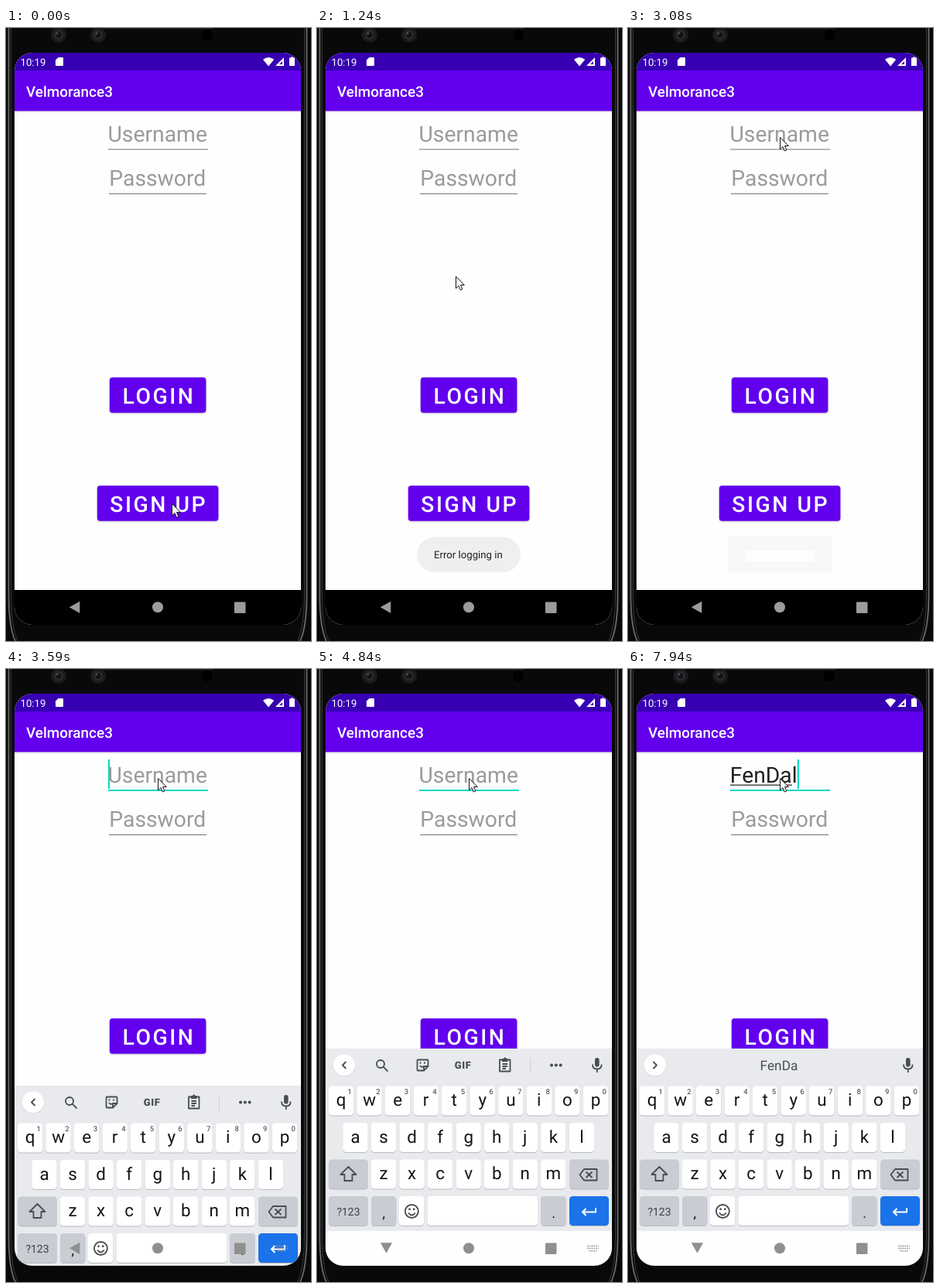
Write an HTML page that moves like this. It is 394 px wide and 793 px high and loops after 8 s.

```html
<!DOCTYPE html>
<html lang="en">
<head>
<meta charset="utf-8">
<title>Login screen</title>
<style>
html, body { margin: 0; width: 100%; height: 100%; overflow: hidden; background: #090909; }
svg { display: block; font-family: Roboto, sans-serif; }
text { white-space: pre; text-rendering: geometricPrecision; }
.hint { font-size: 28.3px; fill: #9b9b9b; }
.typed { font-size: 28.3px; fill: #202020; }
.label { font-size: 28.3px; font-weight: 500; letter-spacing: 2.53px; fill: #fff; }
.key { font-size: 22.4px; fill: #141416; text-anchor: middle; }
.digit { font-size: 9.5px; fill: #5a5e63; text-anchor: middle; font-weight: 500; }
.word { font-size: 17.3px; fill: #4a4d51; text-anchor: middle; }
.line { fill: none; stroke: #494c50; stroke-width: 1.8; stroke-linejoin: round; }
.solid { fill: #494c50; }
</style>
</head>
<body>
<svg id="stage" width="394" height="793" viewBox="0 0 394 793">
  <defs>
    <clipPath id="screen"><rect x="11" y="32" width="370" height="740" rx="23"/></clipPath>
    <clipPath id="signUpShape"><rect x="117.8" y="592" width="156.6" height="45.7" rx="3.8"/></clipPath>
    <linearGradient id="barShadow" x2="0" y2="1">
      <stop stop-color="#d8d8d8"/><stop offset="1" stop-color="#fefefe"/>
    </linearGradient>
    <filter id="raise" x="-10%" y="-20%" width="120%" height="150%">
      <feDropShadow dx="0" dy="1" stdDeviation="1" flood-opacity=".22"/>
    </filter>
    <filter id="press" x="-10%" y="-20%" width="120%" height="160%">
      <feDropShadow dx="0" dy="2" stdDeviation="2" flood-opacity=".35"/>
    </filter>
  </defs>

  <!-- phone body -->
  <rect width="394" height="793" fill="#090909"/>
  <g id="edge" fill="none">
    <path d="M3.5 0V738Q4 776 12 793" stroke="#6a6a6a" stroke-width="1.8"/>
    <path d="M6.5 0V738Q7 774 15 793" stroke="#3a3a3a"/>
  </g>
  <use href="#edge" transform="translate(392) scale(-1 1)"/>
  <rect x="122" y="-2" width="146" height="3" rx="1" fill="#2c2c2c"/>
  <g id="lens">
    <circle cx="68" cy="9" r="10" fill="#1b1b1d"/>
    <circle cx="68" cy="9" r="6" fill="#2b2b2f"/>
    <circle cx="68" cy="9" r="3.5" fill="#121214"/>
    <circle cx="66" cy="7" r="1.2" fill="#5a5a60"/>
  </g>
  <use href="#lens" x="51"/>
  <circle cx="260" cy="9" r="7" fill="#000"/>

  <g clip-path="url(#screen)">
    <rect x="11" y="32" width="370" height="740" fill="#fefefe"/>
    <rect x="11" y="107" width="370" height="3" fill="url(#barShadow)"/>
    <rect x="11" y="55" width="370" height="52.400" fill="#6200ee"/>
    <rect x="11" y="32" width="370" height="23" fill="#3700b3"/>

    <g fill="#fff">
      <text x="18.500" y="48.500" font-size="13.200">10:19</text>
      <path d="M67.500 38H73Q74 38 74 39V48Q74 49 73 49H65Q64 49 64 48V41.500Z"/>
      <path d="M332 40.800Q339 35 346.200 40.800L339.100 49.500Z"/>
      <path d="M359 38V49H348ZM357 43V47H353Z" fill-rule="evenodd"/>
      <path d="M368 37.500H371V38.500H373V49H366V38.500H368Z"/>
      <text x="26" y="88.500" font-size="18.900" font-weight="500">Velmorance3</text>
    </g>

    <text id="userHint" class="hint" x="131.500" y="147">Username</text>
    <rect id="userLine" x="132" width="129"/>
    <text id="userText" class="typed" x="131.800" y="147"></text>
    <rect id="composing" x="132" y="149.500" height="1.300" fill="#333"/>
    <rect id="caret" y="117" width="2" height="38" fill="#03dac5"/>
    <text class="hint" x="133.300" y="204">Password</text>
    <rect x="133" y="214" width="126" height="1" fill="#757575"/>

    <rect x="133.800" y="452" width="124.600" height="45.700" rx="3.800" fill="#6200ee" filter="url(#raise)"/>
    <text class="label" x="150.500" y="486">LOGIN</text>
    <rect id="signUp" x="117.800" y="592" width="156.600" height="45.700" rx="3.800" fill="#6200ee"/>
    <g clip-path="url(#signUpShape)"><circle id="ripple" cx="214" cy="615" fill="#fff"/></g>
    <text class="label" x="134.300" y="626">SIGN UP</text>

    <rect x="11" y="727" width="370" height="45" fill="#000"/>
    <g id="toast">
      <rect x="129" y="658.500" width="134" height="45.500" rx="22.700" fill="#efefef"/>
      <text x="151" y="686" font-size="13.200" fill="#202020">Error logging in</text>
    </g>
    <g id="toastGhost">
      <rect x="129" y="658" width="134" height="46" fill="#f8f8f8"/>
      <rect x="152" y="676" width="88" height="14" fill="#fefefe"/>
    </g>

    <g id="keyboard">
      <rect x="11" y="491" width="370" height="236" fill="#e8eaed"/>
      <rect x="11" y="727" width="370" height="300" fill="#fefefe"/>
      <circle cx="35" cy="513.300" r="14" fill="#c9cbd0"/>
      <circle cx="35" cy="512.500" r="14" fill="#fff"/>
      <path id="chevron" class="line" d="M37.500 508L33 512.500L37.500 517"/>
      <g id="tools">
        <circle class="line" cx="82" cy="511" r="5"/>
        <path class="line" d="M85.700 514.700L91.500 520.500" stroke-width="2.300"/>
        <path class="line" d="M130.500 505.500H142.500Q143.500 505.500 143.500 506.500V514L138 519.500H130.500Q129.500 519.500 129.500 518.500V506.500Q129.500 505.500 130.500 505.500ZM143 514H138V519M133 513Q135 516 138 514" stroke-width="1.600"/>
        <path class="solid" d="M132.500 508.500h2v2h-2zM138 508.500h2v2h-2z"/>
        <text class="solid" x="188.700" y="517.200" font-size="13" font-weight="900" text-anchor="middle" letter-spacing=".6">GIF</text>
        <path class="line" d="M236 505.500H249.500V520.500H236ZM239.500 511H246M239.500 514H246M239.500 517H244" stroke-width="1.600"/>
        <path class="solid" d="M239 504H241Q242.800 500.500 244.600 504H246.500V508H239Z"/>
        <rect x="275" y="503" width="1" height="20" fill="#cfd1d5"/>
        <path d="M303 512.500h.1m5.700 0h.1m5.700 0h.1" stroke="#494c50" stroke-width="4" stroke-linecap="round"/>
      </g>
      <g id="words">
        <text class="word" x="99" y="519"></text>
        <text class="word" x="195" y="519"></text>
        <text class="word" x="295" y="519"></text>
      </g>
      <rect class="solid" x="359" y="503" width="5.600" height="11.500" rx="2.800"/>
      <path class="line" d="M356 511.500Q356 517.500 361.800 517.500T367.600 511.500M361.800 517.500V522"/>
      <g id="keys"></g>
      <path class="line" d="M40.500 644L30.500 654H35.500V662H45.500V654H50.500Z" stroke-width="2"/>
      <path class="line" d="M345 647H361.500V661.500H345L339.500 654.200ZM347.500 650.500L355.500 658M355.500 650.500L347.500 658" stroke-width="2"/>
      <circle class="line" cx="122.400" cy="701.500" r="8.500"/>
      <path class="line" d="M118 703.500Q122.400 709.500 126.800 703.500"/>
      <path class="solid" d="M118.400 697.500h2.400v2.400h-2.400zM124 697.500h2.400v2.400H124z"/>
      <path d="M360 697V702.500H343.500M347.500 698L343 702.500L347.500 707" fill="none" stroke="#fff" stroke-width="2"/>
      <path id="imeIcon" fill="none" stroke="#939393" stroke-width="1.600" stroke-dasharray="1.700 1.100" d="M349 746.500H364M349 749.500H364M351.500 752.800H361.500"/>
    </g>

    <g id="nav">
      <path id="back" d="M-7.700 0L5.800 -7.600V7.600Z"/>
      <circle cx="196" cy="749.300" r="7"/>
      <rect x="295" y="742.500" width="14.500" height="14.500" rx="1"/>
    </g>
  </g>

  <path id="pointer" d="M.5.5V15.800L4 12.500L6.300 18L8.800 17L6.500 11.500H11.300Z" fill="#fff" stroke="#111" stroke-width="1"/>
</svg>

<script>
const LOOP = 8000;
const el = id => document.getElementById(id);
const set = (id, attrs) => {
  for (const name in attrs) el(id).setAttribute(name, attrs[name]);
};

function add(tag, attrs, content = '') {
  const node = document.createElementNS('http://www.w3.org/2000/svg', tag);
  for (const name in attrs) node.setAttribute(name, attrs[name]);
  node.textContent = content;
  el('keys').append(node);
}

function addKey(x, y, width, fill = '#fff') {
  const box = { x, width, height: 38, rx: 4.6 };
  add('rect', { ...box, y: y + 1, fill: '#b7bac0' });
  add('rect', { ...box, y, fill });
}

function buildKeys() {
  const pitch = 36.55, grey = '#c9ccd3';
  const rows = [['qwertyuiop', 31, 539.5], ['asdfghjkl', 49.5, 587], ['zxcvbnm', 86, 634.5]];
  for (const [letters, start, y] of rows) {
    [...letters].forEach((letter, i) => {
      const x = start + i * pitch;
      addKey(x - 16.2, y, 32.4);
      add('text', { class: 'key', x, y: y + 25.8 }, letter);
      if (start === 31) add('text', { class: 'digit', x: x + 11.3, y: y + 10.5 }, (i + 1) % 10);
    });
  }
  addKey(15, 634.5, 51, grey);
  addKey(326, 634.5, 51, grey);
  const bottom = [[15, 51, grey], [70, 32.4, grey], [106, 32.4], [142.5, 142.5], [289, 33, grey], [326, 51, '#1a73e8']];
  for (const [x, width, fill] of bottom) addKey(x, 682, width, fill);
  add('text', { class: 'key', x: 40.5, y: 706.8, style: 'font-size:14px;fill:#3c4043' }, '?123');
  add('text', { class: 'key', x: 86.3, y: 710, style: 'font-size:18px' }, ',');
  add('text', { class: 'key', x: 305.5, y: 710, style: 'font-size:18px' }, '.');
}

// Each track lists [start in ms, value]; a value holds until the next start.
const tracks = {
  pointer: [[0, [214, 615]], [1120, [187, 410]], [1240, [179, 321]], [1950, [193, 180]], [2080, [189, 137]],
    [2230, [190, 122]], [2350, [187, 116]], [2500, [186, 130]], [2620, [184, 141]], [3080, [196, 141]]],
  ripple: [[0, [0, 0]], [430, [45, .2]], [560, [110, .24]], [710, [110, .12]], [830, [0, 0]]],
  toast: [[0, 0], [560, .25], [710, .55], [830, .85], [980, 1], [2500, .8], [2620, .6], [2770, .4], [2920, .2], [3080, 0]],
  slide: [[0, 300], [3470, 150], [3590, 48], [3710, 10], [3830, 0]],
  turn: [[0, 0], [3710, -20], [3830, -62], [3980, -90]],
  caret: [[0, 0], [3350, 1], [3980, 0], [4380, 1], [4840, 0], [5420, 1], [5840, 0], [6410, 1]],
  typed: [[0, 0], [6670, 1], [6790, 2], [6910, 3], [7490, 4], [7790, 5], [7940, 6]],
  composed: [[0, 0], [6790, 1], [7210, 3], [7790, 4], [7940, 5]],
  words: [[0, ['', '', '']], [6910, ['Fe', 'Few', 'Feel']], [7210, ['Fen', 'Few', 'Feel']],
    [7790, ['FenD', 'Few', 'Feel']], [7940, ['', 'FenDa', '']]]
};
const userName = 'FenDal';
const valueAt = (name, time) => tracks[name].findLast(([start]) => start <= time)[1];
const show = (id, on) => set(id, { visibility: on ? 'visible' : 'hidden' });

function render(time) {
  const now = name => valueAt(name, time);
  const focused = time >= 3350;
  const count = now('typed');
  const text = el('userText');
  text.textContent = userName.slice(0, count);
  const widthOf = n => n ? text.getSubStringLength(0, n) : 0;

  show('userHint', !count);
  set('userLine', focused ? { y: 156, height: 2, fill: '#03dac5' } : { y: 156.5, height: 1, fill: '#757575' });
  set('composing', { width: widthOf(Math.min(count, now('composed'))) });
  set('caret', { x: 132 + widthOf(count) });
  show('caret', now('caret'));

  const [radius, glow] = now('ripple');
  set('ripple', { r: radius, opacity: glow });
  set('signUp', { filter: time >= 430 && time < 710 ? 'url(#press)' : 'url(#raise)' });
  set('toast', { opacity: now('toast') });
  show('toastGhost', time >= 3080 && time < 3470);

  const slide = now('slide');
  set('keyboard', { transform: `translate(0 ${slide})` });
  show('keyboard', slide < 300);
  set('imeIcon', { transform: `translate(0 ${-slide})` });
  show('tools', time < 6790);
  set('chevron', { transform: time < 6790 ? '' : 'rotate(180 35 512.5)' });
  now('words').forEach((word, i) => { el('words').children[i].textContent = word; });

  set('nav', { fill: slide < 50 ? '#8f8f8f' : '#9c9c9c' });
  set('back', { transform: `translate(89.5 ${749.3 + now('turn') / 75}) rotate(${now('turn')})` });
  set('pointer', { transform: `translate(${now('pointer')})` });
}

buildKeys();
const begin = performance.now();
function tick() {
  render((performance.now() - begin) % LOOP);
  requestAnimationFrame(tick);
}
tick();
</script>
</body>
</html>
```
